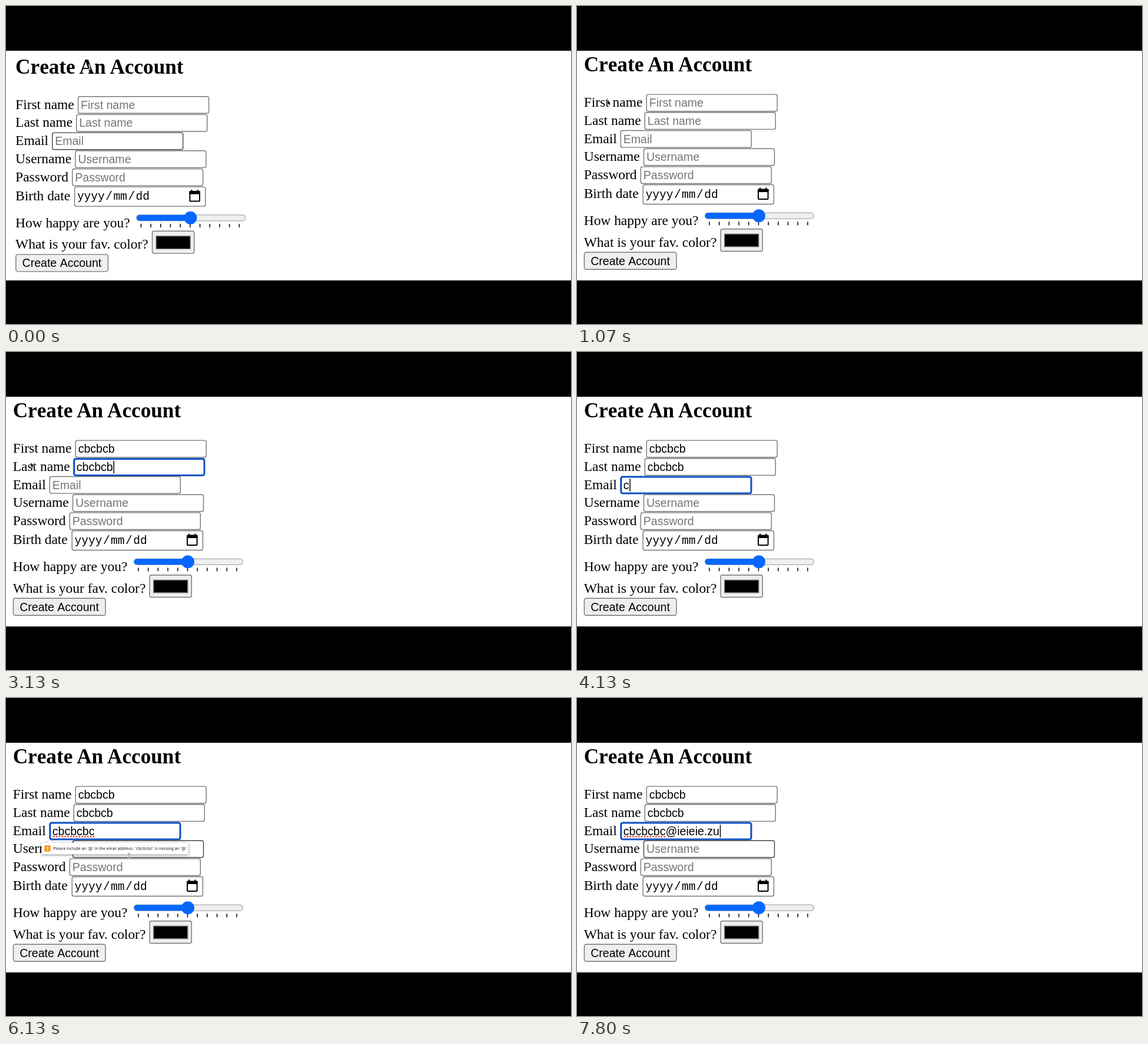
These frames come from a looping animation (960x540 px, 8000 ms). An HTML page with a canvas:

```html
<!DOCTYPE html>
<html lang="en">
<head>
<meta charset="utf-8">
<title>Create An Account</title>
<style>
html, body { margin: 0; width: 100%; height: 100%; overflow: hidden; background: #000; }
canvas { display: block; }
</style>
</head>
<body>
<canvas id="stage" width="960" height="540"></canvas>
<script>
const ctx = document.getElementById('stage').getContext('2d');
const LOOP = 8000;
const SERIF = '23.45px "Liberation Serif", serif';
const SANS = '19.55px "Liberation Sans", sans-serif';
const MONO = '19.55px "Liberation Mono", monospace';
const NAME = 'cbcbcb', MAIL_NAME = 'cbcbcbc', MAIL_HOST = '@ieieie.zu';
const MESSAGE = `Please include an '@' in the email address. '${MAIL_NAME}' is missing an '@'.`;

const fields = [
  { label: 'First name', x: 117.5, focus: [1195, 2265] },
  { label: 'Last name', x: 114.6, focus: [2265, 3665] },
  { label: 'Email', x: 73.6, focus: [3665, LOOP] },
  { label: 'Username', x: 112.8 },
  { label: 'Password', x: 107.6 },
];

// Pointer path: time, x, y
const path = [
  [60, 142, 104], [870, 52, 160], [1930, 52, 160], [2130, 42, 186], [3070, 42, 186],
  [3470, 46, 218], [4600, 46, 218], [4730, 58, 400], [5060, 58, 400], [5190, 61, 428],
  [5600, 61, 428], [5900, 195, 355], [6130, 209, 268], [6330, 205, 231],
];

const within = (t, [from, to]) => t >= from && t < to;

function pointerAt(t) {
  const i = path.findIndex(p => p[0] > t);
  if (i < 0) return path[path.length - 1].slice(1);
  if (i === 0) return path[0].slice(1);
  const [t0, x0, y0] = path[i - 1], [t1, x1, y1] = path[i];
  const u = (t - t0) / (t1 - t0), e = u * u * (3 - 2 * u);
  return [x0 + (x1 - x0) * e, y0 + (y1 - y0) * e];
}

function typed(word, t, start, step) {
  return word.slice(0, t < start ? 0 : 1 + Math.floor((t - start) / step));
}

function values(t) {
  const first = t < 1525 ? '' : t < 1665 ? NAME[0] : NAME[0] + typed(NAME.slice(1), t, 1665, 66.6);
  const host = typed(MAIL_HOST, t, 6862, 103.5);
  return [first, typed(NAME, t, 2662, 80), typed(MAIL_NAME, t, 4125, 70) + host, '', ''];
}

function text(str, x, y, font, color = '#000') {
  ctx.font = font;
  ctx.fillStyle = color;
  ctx.fillText(str, x, y);
}

function box(x, y, w, h, r, fill, stroke, line = 1.4) {
  ctx.beginPath();
  ctx.roundRect(x + line / 2, y + line / 2, w - line, h - line, r);
  ctx.fillStyle = fill;
  ctx.fill();
  if (!stroke) return;
  ctx.lineWidth = line;
  ctx.strokeStyle = stroke;
  ctx.stroke();
}

function rect(x, y, w, h, color = '#000') {
  ctx.fillStyle = color;
  ctx.fillRect(x, y, w, h);
}

function disc(x, y, r, color) {
  ctx.beginPath();
  ctx.arc(x, y, r, 0, 7);
  ctx.fillStyle = color;
  ctx.fill();
}

function drawHeading() {
  ctx.fontKerning = 'none';
  ctx.wordSpacing = '-1.9px';
  text('Create An Account', 11.7, 111, 'bold 35.2px "Liberation Serif", serif');
  ctx.wordSpacing = '0px';
  ctx.fontKerning = 'auto';
}

function drawFields(t) {
  const hovered = t < 300 ? 2 : within(t, [2100, 2265]) ? 1 : t > 6100 ? 3 : -1;
  const content = values(t);
  fields.forEach(({ label, x, focus }, i) => {
    const y = 149.4 + i * 30.7, base = y + 21.7, value = content[i];
    const focused = focus && within(t, focus);
    text(label, 11.7, base, SERIF);
    box(x, y, 223.4, 30, 3, '#fff', i === hovered ? '#444' : '#767676');
    text(value || label, x + 5.2, base, SANS, value ? '#000' : '#757575');
    if (!focused) return;
    const caretOn = !within(t, [5400, 6665]);
    if (caretOn) rect(x + 6 + (value ? ctx.measureText(value).width : 0), y + 4.5, 1.5, 21.5);
    ctx.beginPath();
    ctx.roundRect(x + 1.2, y + 1.3, 221.2, 28, 3);
    ctx.lineWidth = 3;
    ctx.strokeStyle = '#0b52c6';
    ctx.stroke();
  });
  if (t > 5400) for (let x = 81; x < 150; x += 4.85) disc(x, 235.2, 1.5, '#e8524c');
}

function drawDate() {
  text('Birth date', 11.7, 326.3, SERIF);
  box(111.5, 302.8, 223.6, 34.4, 3, '#fff', '#767676');
  [['yyyy', 116.5], ['/', 164.9], ['mm', 178], ['/', 203], ['dd', 216.2]]
    .forEach(([part, x]) => text(part, x, 325.8, MONO));
  box(307, 310.5, 18.6, 18.5, 1, '#fff', '#000', 2);
  rect(307, 311, 18.6, 5);
  rect(310, 308.5, 2.2, 3);
  rect(320.4, 308.5, 2.2, 3);
}

function drawSlider() {
  text('How happy are you?', 11.7, 372.2, SERIF);
  box(216.8, 350.5, 186.2, 11.4, 5.5, '#efefef', '#b5b5b5');
  for (let i = 0; i < 11; i++) rect(224.2 + i * 16.7, 366.3, 1.5, 6);
  box(216.8, 350.5, 96, 11.4, 5.5, '#0567ff');
  disc(309, 356.2, 11, '#0567ff');
}

function drawColorAndButton(t) {
  text('What is your fav. color?', 11.7, 408.7, SERIF);
  box(243.4, 378, 72.6, 39.2, 3, '#efefef', '#767676');
  box(250, 386.5, 59.4, 23, 0, '#000', '#777');
  const hover = within(t, [5130, 5680]);
  box(11.7, 417.6, 158, 30.4, 3.5, hover ? '#e2e2e2' : '#efefef', hover ? '#444' : '#767676');
  text('Create Account', 23.2, 439.8, SANS);
}

function drawBubble(t) {
  ctx.globalAlpha = Math.min(1, (t - 5470) / 130);
  ctx.save();
  ctx.shadowColor = 'rgba(0,0,0,.5)';
  ctx.shadowBlur = 4;
  ctx.shadowOffsetY = 1;
  ctx.fillStyle = '#fff';
  ctx.beginPath();
  ctx.rect(60.5, 246, 249.5, 19.5);
  ctx.moveTo(69, 246);
  ctx.lineTo(74.5, 241);
  ctx.lineTo(80, 246);
  ctx.fill();
  ctx.restore();
  box(64.6, 249.6, 11.8, 11.8, 1.5, '#f59b1c');
  text('!', 69.3, 259, 'bold 9px "Liberation Sans", sans-serif', '#fff');
  text(MESSAGE, 80, 258.2, '6.8px Inter, sans-serif', '#222');
  ctx.globalAlpha = 1;
}

function drawPointer(t) {
  const typing = [[1525, 1930], [2662, 3070], [4125, 4600], [6862, LOOP]];
  if (typing.some(span => within(t, span))) return;
  const [x, y] = pointerAt(t);
  ctx.beginPath();
  if (t < 800 || t > 6050) {
    ctx.moveTo(x - 2, y - 4);
    ctx.lineTo(x, y - 3);
    ctx.lineTo(x + 2, y - 4);
    ctx.moveTo(x, y - 3);
    ctx.lineTo(x, y + 3);
    ctx.moveTo(x - 2, y + 4);
    ctx.lineTo(x, y + 3);
    ctx.lineTo(x + 2, y + 4);
    ctx.strokeStyle = '#fff';
    ctx.lineWidth = 2;
    ctx.stroke();
    ctx.strokeStyle = '#444';
    ctx.lineWidth = 0.8;
    ctx.stroke();
    return;
  }
  [[0, 0], [0, 7.5], [1.8, 6], [3, 8.6], [4.2, 8], [3.1, 5.5], [5.4, 5.4]]
    .forEach(([dx, dy]) => ctx.lineTo(x + dx, y + dy));
  ctx.closePath();
  ctx.strokeStyle = '#fff';
  ctx.lineWidth = 1.2;
  ctx.stroke();
  ctx.fillStyle = '#111';
  ctx.fill();
}

function draw(t) {
  rect(0, 0, 960, 540);
  rect(0, 76, 960, 390, '#fff');
  const pan = t < 60 ? 1 : Math.max(0, 1 - (t - 40) / 480) ** 2;
  ctx.save();
  ctx.translate(4.4 * pan, 3.6 * pan);
  drawHeading();
  drawFields(t);
  drawDate();
  drawSlider();
  drawColorAndButton(t);
  ctx.restore();
  if (within(t, [5475, 6862])) drawBubble(t);
  drawPointer(t);
}

const started = performance.now();
function frame() {
  draw((performance.now() - started) % LOOP);
  requestAnimationFrame(frame);
}
frame();
</script>
</body>
</html>
```
